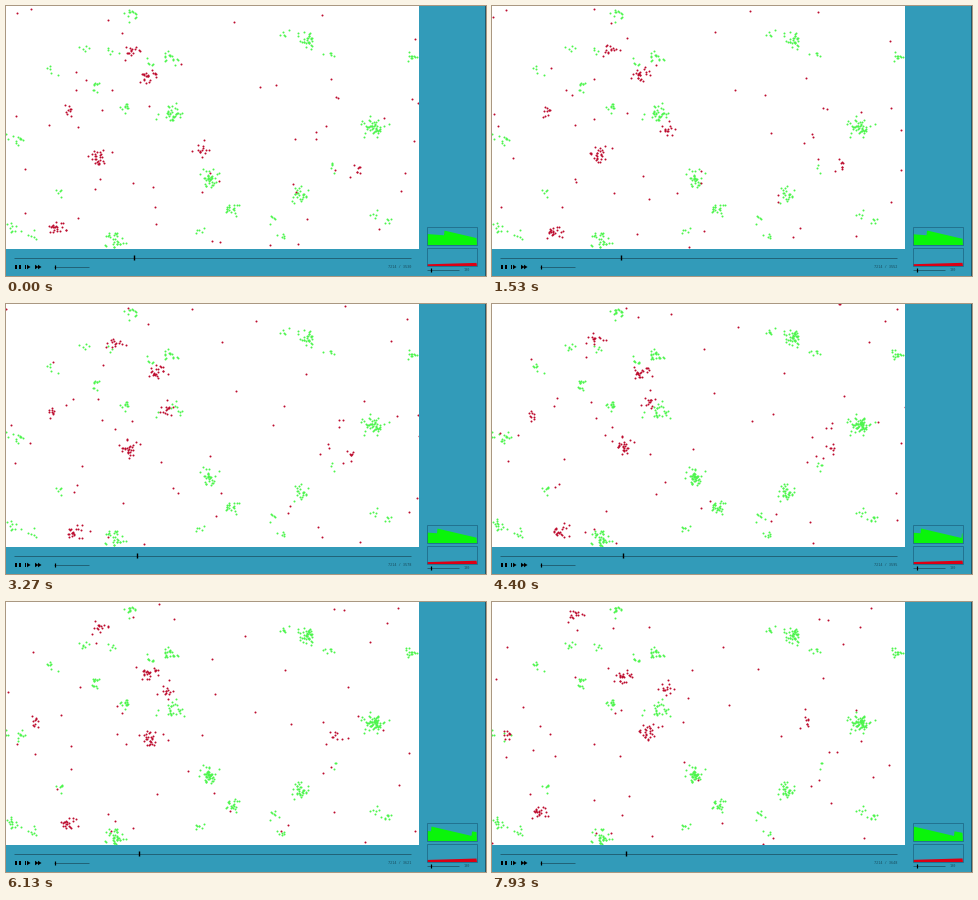
A matplotlib script that plays this animation: 480 px wide and 270 px high, repeating every 8 s.

```python
import numpy as np
import matplotlib.pyplot as plt
from matplotlib.animation import FuncAnimation
from matplotlib.patches import Polygon, Rectangle

FRAMES, STEP = 125, 64
W, H, DPI = 480, 270, 72
FIELD = np.array([413, 243])
REFILL = 3.66  # seconds until new food grows
SCROLL = 2.1   # chart pixels per second
SPEED = 7.5    # hunter pixels per second
BLUE, INK, EDGE = "#329bb9", "#1a4c5d", "#1f6a88"
GREEN, RED = "#4df54d", "#bd0c2e"

rng = np.random.default_rng(12)
times = np.arange(FRAMES) * STEP / 1000
phase = times / 8

# Large food patches: x, y, count
PATCHES = [
    (300, 34, 28), (368, 121, 44), (203, 173, 36), (293, 187, 24),
    (110, 235, 22), (165, 107, 28), (226, 202, 18), (127, 9, 12),
    (119, 101, 10), (161, 50, 10), (404, 51, 10), (88, 80, 9),
    (4, 220, 12), (14, 135, 8),
]

# Flocks: count, then the centre at the start, halfway and at the end
FLOCKS = [
    (26, (94, 152), (130, 143), (158, 130)),
    (14, (126, 45), (106, 35), (83, 11)),
    (22, (142, 70), (150, 68), (130, 75)),
    (14, (197, 144), (160, 100), (177, 87)),
    (20, (50, 222), (69, 228), (46, 210)),
    (9, (62, 104), (42, 110), (14, 133)),
    (8, (352, 165), (340, 148), (314, 120)),
]


def cloud(x, y, n):
    """Points around a centre; larger groups spread wider."""
    spread = 1.8 + 0.6 * np.sqrt(n)
    return rng.normal((x, y), (spread, 0.8 * spread), (n, 2))


def flock_paths(n, start, middle, end):
    """Frame, member, xy: a parabola through the centres plus wandering."""
    curve = np.polyfit([0, 0.5, 1], [start, middle, end], 2)
    centre = np.stack([np.polyval(c, phase) for c in curve.T], axis=1)
    turn = rng.uniform(0, 2 * np.pi, (n, 2))
    wander = 1.5 * np.sin(0.9 * times[:, None, None] + turn)
    return centre[:, None] + cloud(0, 0, n) + wander


def loner_paths(n):
    heading = rng.uniform(0, 2 * np.pi, n)
    velocity = SPEED * np.stack([np.cos(heading), np.sin(heading)], axis=1)
    return rng.uniform((0, 0), FIELD, (n, 2)) + velocity * times[:, None, None]


def safe_from(hunters, food):
    """True for each piece of food that no hunter touches."""
    dx, dy = (food[:, None] - hunters).transpose(2, 0, 1)
    return np.hypot(dx, dy).min(axis=1) > 1.2


small = [(*rng.uniform((0, 0), FIELD), 5) for _ in range(18)]
patches = PATCHES + small
first = np.vstack([cloud(*p) for p in patches])
second = np.vstack([cloud(x, y, round(n * 0.45)) for x, y, n in patches])
food = np.vstack([first, second])
born = np.repeat([0, REFILL], [len(first), len(second)])

hunters = np.concatenate([flock_paths(*f) for f in FLOCKS] + [loner_paths(55)],
                         axis=1) % FIELD
grown = times[:, None] >= born
safe = np.array([safe_from(h, food) for h in hunters])
alive = grown & np.logical_and.accumulate(safe | ~grown)

fig = plt.figure(figsize=(W / DPI, H / DPI), dpi=DPI, facecolor=BLUE)
ax = fig.add_axes([0, 0, 1, 1])
ax.set(xlim=(0, W), ylim=(H, 0))
ax.axis("off")


def box(x, y, w, h, color, z=4):
    ax.add_patch(Rectangle((x, y), w, h, fc=color, lw=0, zorder=z))


def line(x0, y0, x1, y1, width=0.7, color=INK):
    return ax.plot([x0, x1], [y0, y1], color=color, lw=width, zorder=5,
                   solid_capstyle="butt")[0]


def slider(x0, x1, y, knob):
    line(x0, y, x1, y)
    line(knob, y - 2, knob, y + 2, 1.2, "black")


def triangle(x, y, w=3.5, h=4.5):
    ax.add_patch(Polygon([(x, y - h / 2), (x + w, y), (x, y + h / 2)],
                         fc="black", lw=0, zorder=5))


def label(x, y, text):
    return ax.text(x, y, text, size=3.5, family="DejaVu Sans Mono",
                   color=INK, ha="left", va="center", zorder=5)


def dots(color, z):
    return ax.plot([], [], "o", ms=2, mew=0, color=color, zorder=z)[0]


box(0, 0, *FIELD, "white", 0)
food_dots, hunter_dots = dots(GREEN, 1), dots(RED, 2)
box(FIELD[0], 0, W - FIELD[0], H, BLUE, 3)
box(0, FIELD[1], W, H - FIELD[1], BLUE, 3)
box(479, 0, 1, H, "#22586a")

# Playback bar
line(8, 251.5, 405, 251.5)
cursor = line(128, 249, 128, 254, 1.4, "black")
for x in (9, 13):
    box(x, 259, 2, 4, "black")
box(19, 259, 1, 4, "black")
for x in (21, 29, 32):
    triangle(x, 261)
slider(48, 83, 261, 49)
counter = label(381.5, 261.5, "")

# Charts
X0, X1 = 421, 471
refill_x = X1 + SCROLL * REFILL
GREEN_LOG = ([421, 438, 438.1, refill_x, refill_x + 0.1, 488],
             [228, 229.3, 224.5, 234, 229.3, 231])
RED_LOG = ([421, 488], [258.3, 256.4])
green_area, red_area = (
    ax.add_patch(Polygon([(0, 0)] * 3, fc=color, lw=0, zorder=4))
    for color in ("#0af50a", "#dc0014"))
for top in (220.5, 241.5):
    ax.add_patch(Rectangle((X0 - 0.5, top), X1 - X0, 18.5, fill=False,
                           ec=EDGE, lw=0.8, zorder=5))
slider(421, 453, 264, 424.5)
label(457.5, 264, "100")


def chart(area, log, base, t):
    xs = np.arange(X0, X1, 0.5)
    ys = np.interp(xs + SCROLL * t, *log)
    area.set_xy([(X0, base), *zip(xs, ys), (X1, base)])


def draw(i):
    t = times[i]
    food_dots.set_data(*food[alive[i]].T)
    hunter_dots.set_data(*hunters[i].T)
    x = 128.3 + 0.73 * t
    cursor.set_xdata([x, x])
    counter.set_text(f"7214 / {3530 + int(t * 15)}")
    chart(green_area, GREEN_LOG, 239, t)
    chart(red_area, RED_LOG, 260, t)
    return food_dots, hunter_dots, cursor, counter, green_area, red_area


anim = FuncAnimation(fig, draw, frames=FRAMES, interval=STEP, repeat=True,
                     repeat_delay=0, blit=False)
plt.show()
```
